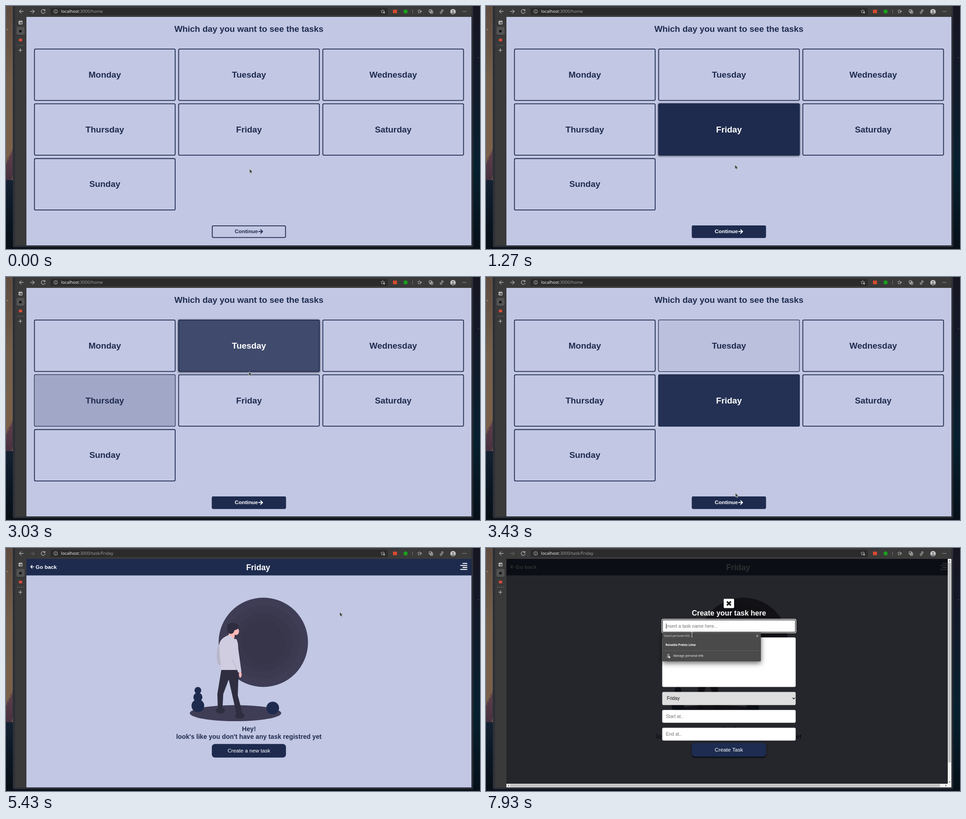
An HTML page with a canvas that plays this animation: 1045 px wide and 536 px high, repeating every 8 s.

```html
<!DOCTYPE html>
<html lang="en">
<head>
<meta charset="utf-8">
<title>Weekly tasks</title>
<style>
html, body { margin: 0; width: 100%; height: 100%; overflow: hidden; background: #0b1420; }
canvas { display: block; }
</style>
</head>
<body>
<canvas id="stage" width="1045" height="536"></canvas>
<script>
const ctx = document.getElementById('stage').getContext('2d');
const LOOP = 8000, FADE = 300, GLOW = 150;
const PAGE_AT = 3990, MODAL_AT = 6470, FOCUS_AT = 7620;
const NAVY = '#1e2b4f', PAGE = '#c2c7e3', INK = '#2f2e41', PLUM = '#3f3d56', LIGHT = '#e4e4e4';
const SANS = '"Liberation Sans", Arial, sans-serif', UI = '"Noto Sans", sans-serif';
const DAYS = ['Monday', 'Tuesday', 'Wednesday', 'Thursday', 'Friday', 'Saturday', 'Sunday'];

const rect = (x, y, w, h) => ({ x, y, w, h });
const center = r => [r.x + r.w / 2, r.y + r.h / 2];
const inside = ([x, y], r) => x > r.x && x < r.x + r.w && y > r.y && y < r.y + r.h;
const cards = Object.fromEntries(DAYS.map((day, i) =>
  [day, rect(61.8 + (i % 3) * 317.9, 94 + Math.floor(i / 3) * 120.8, 312, 115.2)]));
const proceed = rect(453.8, 484, 163.4, 27.5);
const create = rect(453.8, 432.3, 163.4, 30);
const save = rect(453.3, 430, 164.5, 30.6);
const nameField = rect(388.5, 158, 294.2, 28.3);

const picks = [[480, 'Friday'], [2250, 'Thursday'], [2880, 'Tuesday'], [3205, 'Friday']];

// Pointer trips: departure, arrival, destination.
const trips = [
  [170, 480, center(cards.Friday)], [1240, 1270, [549, 351]], [1300, 1550, [540, 396]],
  [1550, 2130, center(cards.Thursday)], [2260, 2370, [524, 203]], [2370, 2600, center(cards.Tuesday)],
  [2900, 3170, center(cards.Friday)], [3210, 3430, [550, 477]], [3430, 3600, center(proceed)],
  [3990, 4750, [512, 90]], [4750, 5430, [736, 142]], [5560, 5800, [706, 319]],
  [5960, 6330, [523, 454]], [7070, 7800, [449, 165]], [7830, 7930, [454, 191]]
];

const clamp = v => Math.max(0, Math.min(1, v));
const easeOut = v => 1 - Math.pow(1 - clamp(v), 2.3);
const smooth = v => v * v * (3 - 2 * v);

function pointer(t) {
  let pos = [537, 360];
  for (const [from, to, goal] of trips) {
    const k = smooth(clamp((t - from) / (to - from)));
    pos = pos.map((v, i) => v + (goal[i] - v) * k);
  }
  return pos;
}
// Share of the last moments the pointer spent over an area.
function hoverGlow(area, t) {
  let hits = 0;
  for (let age = 0; age < GLOW; age += 10) hits += inside(pointer(t - age), area);
  return hits * 10 / GLOW;
}

function box(x, y, w, h, r, fill) {
  ctx.beginPath();
  ctx.roundRect(x, y, w, h, r);
  if (fill) { ctx.fillStyle = fill; ctx.fill(); }
}
const fillRect = (r, radius, fill) => box(r.x, r.y, r.w, r.h, radius, fill);
function disc(x, y, rx, fill, ry = rx) {
  ctx.beginPath();
  ctx.ellipse(x, y, rx, ry, 0, 0, 7);
  ctx.fillStyle = fill;
  ctx.fill();
}
function shape(d, fill) {
  ctx.fillStyle = fill;
  ctx.fill(new Path2D(d));
}
function line(d, color, width = 1) {
  ctx.strokeStyle = color;
  ctx.lineWidth = width;
  ctx.stroke(new Path2D(d));
}
function frame(x, y, w, h, r, color, width) {
  box(x, y, w, h, r);
  ctx.strokeStyle = color;
  ctx.lineWidth = width;
  ctx.stroke();
}
const ring = (x, y, r, color = LIGHT) => frame(x - r, y - r, 2 * r, 2 * r, r, color, .9);
function at(x, y, draw) {
  ctx.save();
  ctx.translate(x, y);
  draw();
  ctx.restore();
}
function arrow(x, y, dir, r, color, width) {
  at(x, y, () => line(`M${-dir * r} 0H${dir * r}M0 ${-r}L${dir * r} 0L0 ${r}`, color, width));
}
function cross(x, y, r, color, width) {
  at(x, y, () => line(`M${-r} ${-r}L${r} ${r}M${r} ${-r}L${-r} ${r}`, color, width));
}
function plus(x, y, r) {
  at(x, y, () => line(`M${-r} 0H${r}M0 ${-r}V${r}`, LIGHT, .9));
}
function star(x, y) {
  ctx.beginPath();
  for (let i = 0; i < 10; i++) {
    const r = i % 2 ? 2 : 4.3, a = i * Math.PI / 5;
    ctx.lineTo(x + r * Math.sin(a), y - r * Math.cos(a));
  }
  ctx.closePath();
  ctx.strokeStyle = '#c4c4c4';
  ctx.lineWidth = .8;
  ctx.stroke();
}
function label(str, x, cy, size, color, { weight = 'bold', align = 'center', family = SANS } = {}) {
  ctx.font = `${weight} ${size}px ${family}`;
  ctx.textAlign = align;
  ctx.fillStyle = color;
  ctx.fillText(str, x, cy + size * .355);
}
function shadow(alpha, blur, dy, draw) {
  ctx.save();
  ctx.shadowColor = `rgba(0,0,0,${alpha})`;
  ctx.shadowBlur = blur;
  ctx.shadowOffsetY = dy;
  draw();
  ctx.restore();
}
function gradient(top, bottom, ...colors) {
  const g = ctx.createLinearGradient(0, top, 0, bottom);
  colors.forEach((c, i) => g.addColorStop(i / (colors.length - 1), c));
  return g;
}

function drawDesktop() {
  box(0, 0, 20, 390, 0, gradient(0, 340, '#5d4b40', '#74604c', '#7b6049'));
  box(1025, 0, 20, 536, 0, gradient(0, 536, '#171522', '#111a2a', '#06202f', '#061019'));
  const trees = gradient(315, 385, '#5f414a', '#46303f');
  for (let x = 0; x < 20; x++) box(x, 345 - x * 1.9 + 4 * Math.sin(x * 1.7), 1.2, 60, 0, trees);
  box(0, 384, 20, 152, 0, gradient(384, 536, '#142132', '#0a1622', '#070d14'));
  disc(3, 52, 1, '#c9b8a5');
  disc(1041.5, 114, .8, '#8794a5');
  box(0, 532, 1045, 4, 0, '#0b1018');
  box(15, -6, 1015, 538, 4, '#2c2f37');
  box(20, 0, 1006, 528, 0, '#3a3a3a');
}

function drawChrome(url, canForward) {
  arrow(34, 12, -1, 4.5, LIGHT);
  arrow(58, 12, 1, 4.5, canForward ? LIGHT : '#707070');
  line('M85.5 9.5A4.3 4.3 0 1 0 86.3 12.5M86 7V10H83', LIGHT);
  box(98, 4, 744, 16, 3, '#2b2b2b');
  ring(109.5, 12, 4, '#d0d0d0');
  line('M109.5 11.5V14.2M109.5 9.3V10.3', '#d0d0d0', .9);
  const plain = { weight: 'normal', align: 'left', family: UI };
  label('localhost', 121.5, 12, 9.33, '#f2f2f2', plain);
  label(url, 121.5 + ctx.measureText('localhost').width, 12, 9.33, '#9c9c9c', plain);

  star(830.5, 12);
  disc(833.5, 14.5, 2, '#aaa');
  box(853, 8, 9, 8, 1, '#d6492f');
  disc(881, 12, 4.5, '#18a01c');
  line('M896.5 8V16', '#777');
  star(911.5, 12);
  line('M913 12H917', LIGHT, .9);
  frame(933, 8, 5.5, 6, 1, LIGHT, .9);
  frame(935.5, 10.5, 5.5, 6, 1, LIGHT, .9);
  plus(938.2, 13.5, 1.5);
  ring(962, 10, 2);
  ring(959, 14.5, 2);
  disc(985.5, 12.5, 6, '#c9c9c9');
  disc(985.5, 10.7, 2, '#777');
  disc(985.5, 15.8, 3.5, '#777', 2);
  for (let i = -1; i < 2; i++) disc(1010.5 + i * 3.2, 12, .8, LIGHT);

  frame(28.5, 33, 7, 7, 1, LIGHT, 1.2);
  line('M28.5 34.5H35.5M31 35V40', LIGHT, 1.2);
  shadow(.4, 2, 1, () => box(23, 46, 18, 18, 3, '#525252'));
  disc(31.8, 55.5, 2.8, '#111');
  box(28.5, 72, 7, 6, 0, '#d64a3b');
  line('M24 86.5H40', '#5a5a5a');
  plus(31.5, 97.5, 4);
}

function fillOf(day, t) {
  const past = picks.filter(([when]) => when <= t).reverse();
  if (!past.length) return [0, false];
  const p = easeOut((t - past[0][0]) / FADE);
  if (past[0][1] === day) return [p, true];
  return [past[1]?.[1] === day ? 1 - p : 0, false];
}
function outlined(area, fill, glow, fading) {
  if (glow > 0) shadow(.75 * glow, 4, 1, () => fillRect(area, 3, PAGE));
  ctx.globalAlpha = fill;
  fillRect(area, 3, NAVY);
  ctx.globalAlpha = 1;
  const lw = fading ? 1.2 : 1.8;
  frame(area.x + lw / 2, area.y + lw / 2, area.w - lw, area.h - lw, 2.5, NAVY, lw);
}

function drawHome(t) {
  label('Which day you want to see the tasks', 535.5, 50, 18.9, NAVY);
  for (const day of DAYS) {
    const [fill, on] = fillOf(day, t), [cx, cy] = center(cards[day]);
    outlined(cards[day], fill, hoverGlow(cards[day], t), !on && fill > .001);
    label(day, cx, cy - .5, 18.9, on ? '#fff' : NAVY);
  }
  const ready = easeOut((t - picks[0][0]) / FADE), ink = ready > 0 ? '#fff' : NAVY;
  outlined(proceed, ready, 0);
  label('Continue', 529.8, 497.3, 11.8, ink);
  arrow(561, 497.5, 1, 4.6, ink, 1.9);
}

function drawPerson() {
  const skin = '#ffb8b8', shirt = '#d0cde1';
  disc(471, 236, 6.5, '#b9b7ca', 23);
  shape('M475 267H513L511 325 522 367 509 370 491 290 479 322 477 357H467L466 322Z', INK);
  disc(473, 358.5, 10, INK, 7);
  disc(515.5, 370, 10.5, INK, 7);
  disc(516.5, 279, 3, skin, 7);
  box(491, 184, 13, 16, 4, skin);
  shape('M493 191Q500 201 508 201 512 208 512 222L519 273 512 275 510 269H474L470 214Q471 199 493 191Z', shirt);
  line('M497.5 245Q505 257 511 272', '#a9a7be', .8);
  disc(507, 184, 6.8, skin, 8);
  disc(500, 173.5, 13, INK, 8.5);
  disc(495.5, 181, 8, INK, 8.5);
}

function drawTaskPage(t) {
  box(45, 24, 981, 36.5, 0, NAVY);
  arrow(58, 41.5, -1, 3.6, '#fff', 1.5);
  label('Go back', 65.3, 42, 11.8, '#fff', { align: 'left' });
  label('Friday', 555.8, 42.5, 17.6, '#fff');
  for (let i = 0; i < 4; i++) {
    const x = i % 2 ? 1001.5 : 1006.5;
    box(x, 33 + i * 4.4, 1017 - x, 2.1, .5, '#fff');
  }

  ['#3f3d56', '#3c3a51', '#38374c', '#363549'].forEach((c, i) => disc(567.3, 208, 98.5 - i * 17, c));
  disc(506, 364.3, 100.8, PLUM, 17.7);
  disc(423, 314, 7.5, NAVY);
  disc(423, 329, 10, NAVY);
  disc(423, 348, 14, NAVY);
  disc(588, 353, 14, NAVY);
  drawPerson();

  label('Hey!', 535.5, 398.5, 14.16, NAVY);
  label("look's like you don't have any task registred yet", 535.5, 415.5, 14.16, NAVY);
  shadow(.5 * hoverGlow(create, t), 3, 1, () => fillRect(create, 7, NAVY));
  label('Create a new task', 535.5, 447, 11.7, '#fff', { weight: 'normal' });
}

function scrollbar(length, thumb) {
  const arrowHead = (y, dir) => shape(`M2 ${y}H6L4 ${y + 2.5 * dir}Z`, '#505050');
  box(0, 0, 8, length, 0, '#f1f1f1');
  box(1, 8, 6, thumb, 0, '#c1c1c1');
  arrowHead(5.5, -1);
  arrowHead(length - 5, 1);
}
function drawScrollbars(focused) {
  box(1018, 24, 8, 504, 0, '#f1f1f1');
  at(1018, 24, () => scrollbar(focused ? 496 : 504, focused ? 441 : 455));
  if (focused) at(45, 528, () => {
    ctx.rotate(-Math.PI / 2);
    scrollbar(973, 948);
  });
}

function drawPopup() {
  const plain = { weight: 'normal', align: 'left', family: UI };
  shadow(.6, 12, 4, () => box(388.5, 187, 217.5, 63, 2, '#4a4a4a'));
  label('Saved personal info', 392, 194, 6.2, '#d0d0d0', plain);
  cross(598, 194, 2.3, LIGHT, .9);
  label('Renaldo Prates Lima', 395.7, 213.3, 6.5, '#fff', { ...plain, weight: 'bold' });
  line('M389 226.5H606', '#666', .8);
  ring(402, 236.2, 2);
  line('M399 242Q399 239 402 239', LIGHT, .9);
  box(402, 239, 4, 3.5, .5, LIGHT);
  label('Manage personal info', 413, 238, 6.47, '#f0f0f0', plain);
}

function drawField(y, h, hint, fill = '#fff', ink = '#757575', indent = 8) {
  box(nameField.x, y, nameField.w, h, 3, fill);
  label(hint, nameField.x + indent, y + 14.2, 10.2, ink, { weight: 'normal', align: 'left' });
}
function drawModal(t) {
  const focused = t >= FOCUS_AT;
  ctx.globalAlpha = clamp((t - MODAL_AT) / 130);
  box(45, 24, 981, 504, 0, 'rgba(10,10,11,.85)');
  box(524, 112, 23, 20.5, 2, '#fff');
  cross(535.5, 122.3, 4.3, '#111', 3.4);
  label('Create your task here', 535.5, 143.3, 16, '#fff');

  drawField(nameField.y, nameField.h, 'insert a task name here...');
  if (focused) {
    const { x, y, w, h } = nameField;
    frame(x - .7, y - .7, w + 1.4, h + 1.4, 3, '#fff', 1.4);
    frame(x + .6, y + .6, w - 1.2, h - 1.2, 2, '#101010', 1.2);
    line('M397.3 166.5V178', '#111', .9);
  }
  drawField(197.3, 109.2, 'insert a description of task here');
  drawField(317.4, 29, 'Friday', '#dedede', '#111', 10.2);
  line('M676 330.3L678.6 333 681.2 330.3', '#111', 1.4);
  drawField(357.2, 28.2, 'Start at..');
  drawField(396.5, 28.2, 'End at..');
  const over = inside(pointer(t), save);
  shadow(.8, 3, 1.5, () => fillRect(save, 8, over ? '#202a52' : '#1d2c50'));
  label('Create Task', 535.5, 444.8, 11.7, '#fff', { weight: 'normal' });
  if (focused) drawPopup();
  drawScrollbars(focused);
  ctx.globalAlpha = 1;
}

function drawPointer(t) {
  const pos = pointer(t);
  const targets = t < PAGE_AT ? [...Object.values(cards), proceed] : t < MODAL_AT ? [create] : [save];
  const glyph = (d, filled = true) => {
    line(d, '#d9dcd8', filled ? 1.3 : 2);
    if (filled) shape(d, '#3f4643');
    else line(d, '#444');
  };
  at(...pos, () => {
    ctx.lineJoin = 'round';
    if (t >= MODAL_AT && (inside(pos, nameField) || t >= FOCUS_AT)) glyph('M-2-5H2M0-5V5M-2 5H2', false);
    else if (targets.some(area => inside(pos, area)) || (t > 2300 && t < 2400)) glyph('M-1 0Q0-1 1 0L2 3.5 5 4Q6.5 4.5 6.3 7L5.5 10.5H0L-3.5 6.5Q-3.5 5 0 6Z');
    else glyph('M0 0L.3 8 2.1 6.4 3.4 9.3 4.8 8.6 3.5 5.9 6 5.6Z');
  });
}

function render(t) {
  const home = t < PAGE_AT;
  drawDesktop();
  drawChrome(home ? ':3000/home' : ':3000/task/Friday', home);
  box(45, 24, 981, 504, 0, PAGE);
  if (home) drawHome(t);
  else drawTaskPage(t);
  if (t >= MODAL_AT) drawModal(t);
  drawPointer(t);
}

const start = performance.now();
function tick(now) {
  render(Math.max(0, now - start) % LOOP);
  requestAnimationFrame(tick);
}
render(0);
requestAnimationFrame(tick);
</script>
</body>
</html>
```
